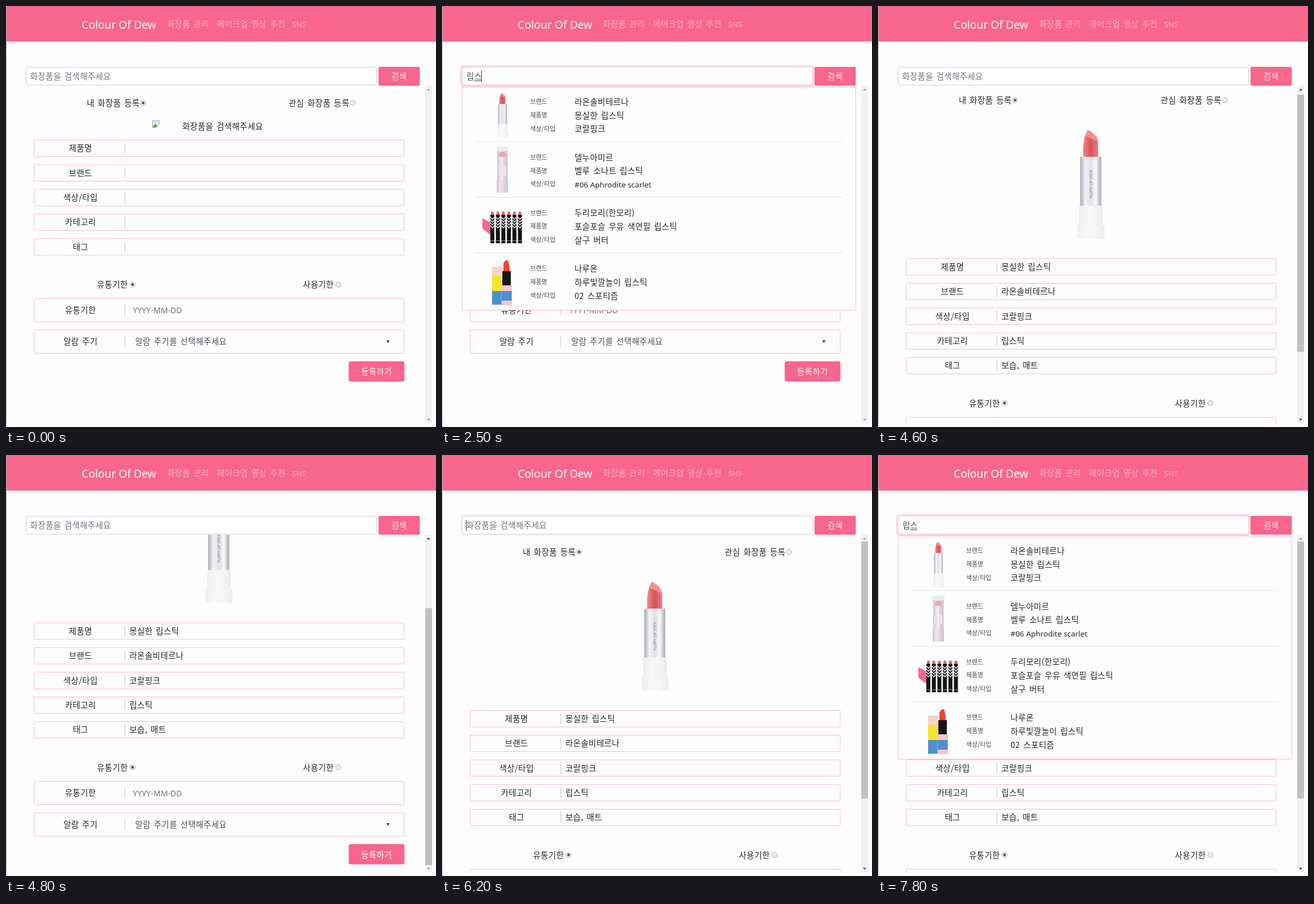
Animation, 756 px wide and 740 px high, one loop 8000 ms. Source, as an HTML page:

```html
<!DOCTYPE html>
<html lang="ko">
<head>
<meta charset="utf-8">
<title>화장품 관리</title>
<style>
  html, body { margin: 0; width: 100%; height: 100%; overflow: hidden; background: #fdfdfd; }
  svg { display: block; }
  text { font: 14.4px "Noto Sans CJK KR", "Noto Sans CJK", sans-serif; letter-spacing: .38px; word-spacing: 1.3px; fill: #212529; white-space: pre; }
  .small { font-size: 10.8px; letter-spacing: .12px; word-spacing: 0; fill: #40454a; }
  .latin { font: 13.4px "Noto Sans", sans-serif; letter-spacing: 0; word-spacing: 0; }
  .date { font-size: 14px; }
  .title { font-size: 19.2px; }
  .mid { text-anchor: middle; }
  .white { fill: #fff; }
  .faded { fill: #fff; fill-opacity: .5; }
  .hint { fill: #6c757d; }
  .soft { fill: #495057; }
  .box { fill: none; stroke: #fbb9ca; }
  .pink { fill: #f8658d; }
</style>
</head>
<body>
<svg id="stage" width="756" height="740" viewBox="0 0 756 740"></svg>
<script>
const LOOP = 8000;
const RESULT_SHIFT = 213.5;   // extra height once a product picture is shown
const VIEW = { top: 140, height: 594, content: 748, trackTop: 152, track: 569 };

const product = { brand: '라온솔비테르나', name: '몽실한 립스틱', shade: '코랄핑크' };
const products = [
  product,
  { brand: '델누아미르', name: '벨루 소나트 립스틱', shade: '#06 Aphrodite scarlet', latin: true },
  { brand: '두리모리(한모리)', name: '포슬포슬 우유 색연필 립스틱', shade: '살구 버터' },
  { brand: '나루온', name: '하루빛깔놀이 립스틱', shade: '02 스포티즘' },
];

// Each track is a list of [start time, value]; values hold until the next start.
const typing = [[0, ''], [1800, 'ㄹ'], [2000, '리'], [2100, '립'], [2400, '립ㅅ'], [2500, '립스'],
  [2600, '립슽'], [2700, '립스티'], [2800, '립스틱'], [4000, ''],
  [6700, 'ㄹ'], [6800, '리'], [6900, '립'], [7200, '립ㅅ'], [7300, '립스']];
const focus = [[0, 0], [900, .3], [1000, 1], [3900, .9], [4000, 0], [6200, .3], [6300, 1]];
const caretOn = [[0, 0], [900, 1], [1400, 0], [1800, 1], [3300, 0], [6200, 1], [7800, 0]];
const menuOpen = [[0, 0], [2500, 1], [4000, 0], [7300, 1]];
const scrolling = [[0, 0], [4600, 5], [4700, 104], [4800, 154], [5300, 105], [5400, 8], [5500, 0]];
const at = (track, t) => track.filter(([start]) => start <= t).pop()[1];

// Shape helpers; text is placed by its vertical centre.
const text = (x, cy, s, cls = '', dy = 5.2) => `<text x="${x}" y="${cy + dy}" class="${cls}">${s}</text>`;
const rect = (x, y, w, h, fill, more = '') => `<rect x="${x}" y="${y}" width="${w}" height="${h}" fill="${fill}" ${more}/>`;
const box = (x, y, w, h) => `<rect x="${x}" y="${y}" width="${w}" height="${h}" rx="1" class="box"/>`;
const path = (d, fill, more = '') => `<path d="${d}" fill="${fill}" ${more}/>`;
const gradient = (id, ...colors) => `<linearGradient id="${id}">` +
  colors.map((c, i) => `<stop offset="${i / (colors.length - 1)}" stop-color="${c}"/>`).join('') + '</linearGradient>';

const radio = (x, y, on) => `<circle cx="${x}" cy="${y}" r="4.6" fill="#eee" stroke="#b0b0b0"/>` +
  (on ? `<circle cx="${x}" cy="${y}" r="2.4" fill="#555"/>` : '');

const row = (y, h, label) => box(49.5, y, 650.5, h) + text(131, y + h / 2, label, 'mid') +
  rect(208.3, y + h / 2 - 10, 1.4, 20, '#d2d2d2');

// Lipstick of 47 x 191, origin at the top centre.
const lipstick = path('M-14 48V30Q-12 10 -6 0Q10 7 12.500 20V48Z', 'url(#coral)') +
  path('M-6 0Q10 7 12.500 20Q4 17 -10 10Z', '#fb8f8b') +
  rect(-19, 47, 37, 87, 'url(#silver)') +
  rect(-21, 133, 41.5, 36, 'url(#cap)') + rect(-23.500, 167, 47, 24, 'url(#cap)', 'rx="2"');

const frostedTube = rect(96, 247.5, 21, 8, '#ececf0', 'rx="1"') + rect(97, 255, 18.5, 58, 'url(#frost)') +
  path('M100 265V259Q106 253 112 259V265Z', '#e9a4b8') +
  rect(99, 281, 14, 17, '#e9e4e9') + rect(105, 266, 2, 44, '#f7f1f5') +
  rect(96, 306, 20, 22, 'url(#frost)', 'rx="1"');

const pencils = path('M71 373L86 381V403L71 391Z', '#f9639a') +
  Array.from({ length: 6 }, (_, i) => `<g transform="translate(${85 + i * 9.7} 361)">` +
    path('M1 7V2Q3.500 -2 6 2V7Z', '#e8616a') + rect(0, 6, 7, 50, '#151515') +
    [10, 15, 20, 25].map(y => path(`M0 ${y}L3.500 ${y + 4}L7 ${y}`, 'none', 'stroke="#fff" stroke-width="1.3"')).join('') +
    rect(0, 51, 7, 1, '#999') + '</g>').join('');

const boxedStick = rect(88, 458, 17, 67, '#f8d2c8') + rect(88, 474, 17, 27, '#f6e32c') + rect(88, 501, 17, 24, '#4d8fd0') +
  path('M108 467V452Q112 446 116 447Q119 455 119 467Z', '#f0432e') + rect(106, 466, 15, 26, '#161616') +
  rect(104.5, 491, 18.5, 35, '#f5c6ca', 'rx="1"') + rect(105, 501, 17.5, 17, '#4d8fd0');

const thumbnails = [`<g transform="translate(106.500 153) scale(.414)">${lipstick}</g>`, frostedTube, pencils, boxedStick];

const menuItem = ({ brand, name, shade, latin }, i) => {
  const y = 168 + i * 97.8;
  return ['브랜드', '제품명', '색상/타입'].map((s, k) => text(155, y + k * 23.8, s, 'small', 3.9)).join('') +
    text(233, y + .5, brand) + text(233, y + 24.3, name) + text(233, y + 48, shade, latin ? 'latin' : '') +
    (i ? rect(57, y - 28, 647, 1, '#e3e3e3') : '') + thumbnails[i];
};

const rowTop = i => 235.5 + i * 43.4;
const fields = ['제품명', '브랜드', '색상/타입', '카테고리', '태그'];
const values = [product.name, product.brand, product.shade, '립스틱', '보습, 매트'];

document.getElementById('stage').innerHTML = `
<defs>
  ${gradient('coral', '#f58a86', '#d5535a', '#ee7c7b')}
  ${gradient('silver', '#a9abb2', '#f4f4f8', '#dfe0e6', '#f8f8fb', '#a5a7ae')}
  ${gradient('cap', '#ededed', '#f8f8f7', '#f6f6f5', '#ebebeb')}
  ${gradient('frost', '#cfc4cf', '#f1e6ea', '#e2d3da', '#cbc3cf')}
  <clipPath id="view">${rect(1, VIEW.top, 736, VIEW.height, '#000')}</clipPath>
</defs>
${rect(0, 0, 756, 740, '#fdfdfd')}
<rect width="756" height="62.5" class="pink"/>
${rect(0, 0, 1, 740, '#b4b4b4')}
${text(133, 32, 'Colour Of Dew', 'latin title white', 7.5)}
${text(283, 32, '화장품 관리', 'faded')}${text(371, 32, '메이크업 영상 추천', 'faded')}${text(503, 32, 'SNS', 'latin faded')}

<g clip-path="url(#view)"><g id="page">
  ${text(142, 170.5, '내 화장품 등록')}${radio(241, 170.5, true)}
  ${text(497, 170.5, '관심 화장품 등록')}${radio(610, 170.5)}
  <g id="empty">
    ${rect(257.5, 201.5, 12, 12, '#d9e6fa', 'stroke="#a9a9a9"')}
    ${path('M258 213L262 207L269 213Z', '#5ca24c')}${path('M270.500 207L263 214.500H270.500Z', '#fdfdfd')}
    ${text(310, 212, '화장품을 검색해주세요')}
  </g>
  <g id="picked">
    <g transform="translate(374.500 223)">${lipstick}
      <text class="latin" transform="translate(2 120) rotate(-90)" style="font-size:6.2px;fill:#777">FLUFFY LIP STICK</text></g>
    ${values.map((s, i) => text(217, rowTop(i) + 14.5 + RESULT_SHIFT, s)).join('')}
  </g>
  <g id="form">
    ${fields.map((s, i) => row(rowTop(i), 29, s)).join('')}
    ${text(160, 490, '유통기한')}${radio(222.5, 489.5, true)}
    ${text(522, 490, '사용기한')}${radio(584.5, 489.5)}
    ${row(514.5, 40.5, '유통기한')}${text(223, 535, 'YYYY-MM-DD', 'latin date hint')}
    ${row(569.5, 41, '알람 주기')}${text(227, 590, '알람 주기를 선택해주세요', 'soft')}
    ${path('M668.800 587.500H674L671.400 592.500Z', '#333')}
    <rect x="602.5" y="624.5" width="98" height="35.5" rx="3.5" class="pink"/>
    ${text(651.5, 643, '등록하기', 'mid white')}
  </g>
</g></g>

${rect(737, VIEW.top, 12, VIEW.height, '#f1f1f1')}
<rect id="thumb" x="737" width="12" height="${VIEW.track * VIEW.height / VIEW.content}" fill="#c1c1c1"/>
<path id="up" d="M739.800 148.500H746.200L743 145Z"/><path id="down" d="M739.800 725.500H746.200L743 729Z"/>

${rect(35.5, 107.5, 616, 31.5, '#fff', 'rx="3.500" stroke="#ccd1d9"')}
<g id="focus">
  ${rect(33.5, 105.5, 620, 35.5, 'none', 'rx="5" stroke="#fdd8e2" stroke-width="3"')}
  ${rect(35.5, 107.5, 616, 31.5, 'none', 'rx="3.500" stroke="#fcc9d6"')}
</g>
<g id="hint">${text(42.5, 124, '화장품을 검색해주세요', 'hint')}</g>
<text id="query" x="43" y="129.2" class="soft"></text>
<rect id="underline" y="131" width="13" height="1" fill="#333"/>
<rect id="caret" y="114" width="1" height="19" fill="#333"/>
<rect x="655" y="107" width="72.5" height="33" rx="2" class="pink"/>
${text(691, 124, '검색', 'mid white')}

<g id="menu">
  ${rect(35.5, 142.5, 692, 392, '#fdfdfd', 'stroke="#fbb9ca"')}
  ${products.map(menuItem).join('')}
</g>`;

const el = id => document.getElementById(id);
const show = (id, on) => el(id).style.display = on ? '' : 'none';
const shift = (id, y) => el(id).setAttribute('transform', `translate(0 ${y})`);

function render(t) {
  const query = at(typing, t);
  const picked = t >= 4000;
  const scroll = at(scrolling, t);
  const maxScroll = VIEW.content - VIEW.height;
  const composing = query && !(t >= 3800 && t < 4000);

  el('query').textContent = query;
  show('hint', !query);
  show('underline', composing);
  el('underline').setAttribute('x', 43 + 13.6 * (query.length - 1));
  show('caret', at(caretOn, t));
  el('caret').setAttribute('x', Math.floor(42.5 + 13.5 * query.length));
  el('focus').setAttribute('opacity', at(focus, t));
  show('menu', at(menuOpen, t));

  show('empty', !picked);
  show('picked', picked);
  shift('form', picked ? RESULT_SHIFT : 0);
  shift('page', -scroll);
  show('thumb', picked);
  el('thumb').setAttribute('y', VIEW.trackTop + scroll * VIEW.track / VIEW.content);
  el('up').setAttribute('fill', scroll > 0 ? '#505050' : '#a3a3a3');
  el('down').setAttribute('fill', picked && scroll < maxScroll ? '#505050' : '#a3a3a3');
}

const start = performance.now();
function tick() {
  render((performance.now() - start) % LOOP);
  requestAnimationFrame(tick);
}
tick();
</script>
</body>
</html>
```
